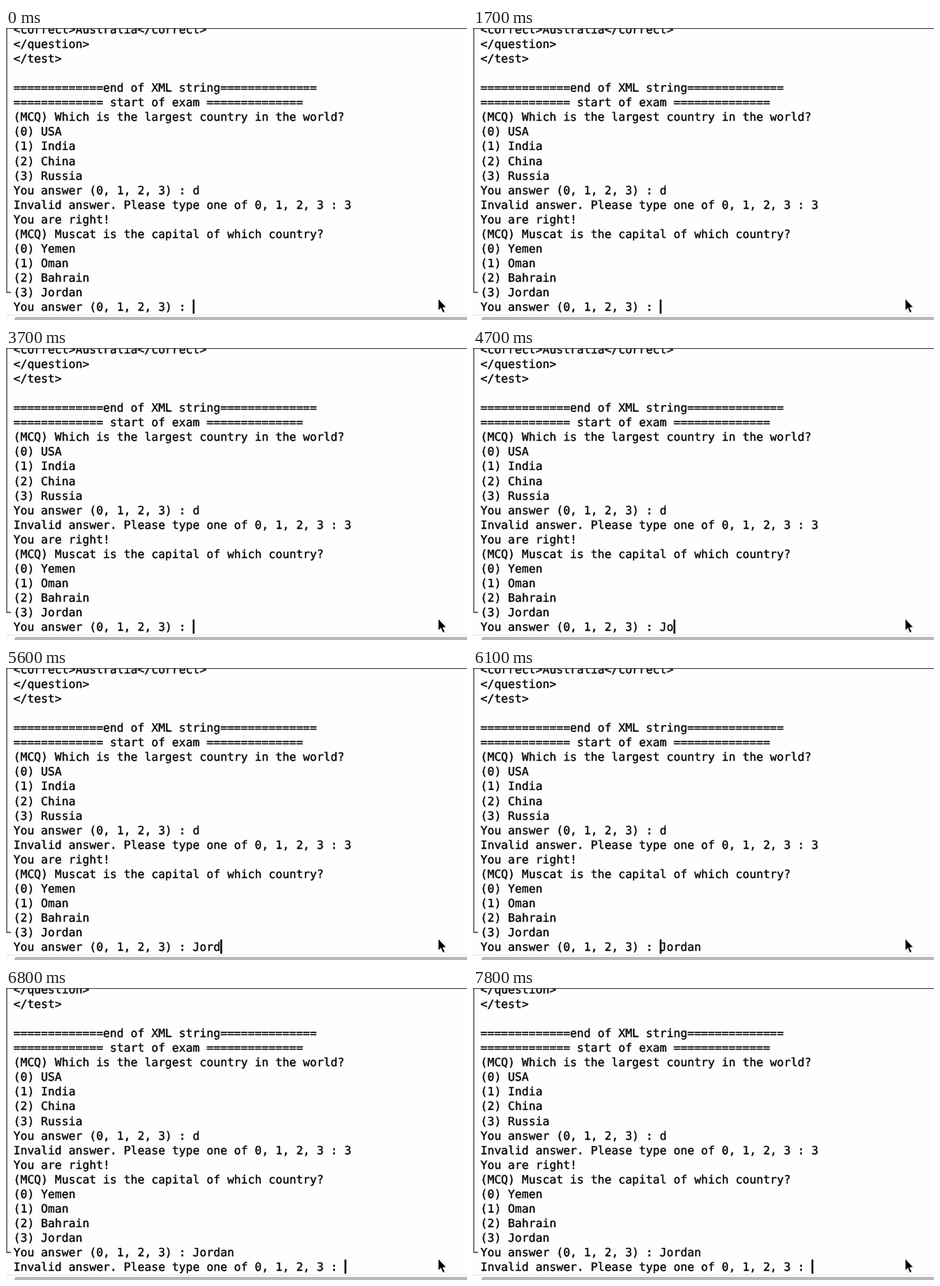
An HTML page for the animation above (8 s loop, 600 px wide and 381 px high).

```html
<!DOCTYPE html>
<html lang="en">
<head>
<meta charset="utf-8">
<title>Quiz console</title>
<style>
  html, body { margin: 0; width: 100%; height: 100%; overflow: hidden; background: #fefefe; }
  svg { display: block; }
  text {
    font: 14.92px "DejaVu Sans Mono", monospace; white-space: pre; text-rendering: geometricPrecision;
    fill: #000; stroke: #000; stroke-width: .35px;
  }
</style>
</head>
<body>
<svg width="600" height="381" viewBox="0 0 600 381">
  <g id="rows"></g>
  <rect id="caret" y="354.3" width="2.4" height="18.5"/>
  <rect width="600" height="1.2" fill="#555"/>
  <path d="M1 0V345H6.5" fill="none" stroke="#444" stroke-width="1.3"/>
  <rect y="374" width="600" height="1" fill="#e4e4e4"/>
  <rect x="11" y="377" width="620" height="8" rx="3" fill="#b8b8b8"/>
  <path d="M562.5 353V368.7L566 365.6L568.6 371.6L571.2 370.5L568.7 364.7H573.2Z" fill="#000" stroke="#fff" stroke-width=".8"/>
</svg>
<script>
const LEFT = 9.7, CHAR = 8.98, LINE = 19.05, BASE = 369, LOOP = 8000;
const bar = n => "=".repeat(n);
const prompt = "You answer (0, 1, 2, 3) : ";
const retry = "Invalid answer. Please type one of 0, 1, 2, 3 : ";
const choices = names => names.map((name, i) => `(${i}) ${name}`);
const log = [
  "<correct>Australia</correct>", "</question>", "</test>", "",
  bar(13) + "end of XML string" + bar(14),
  bar(13) + " start of exam " + bar(14),
  "(MCQ) Which is the largest country in the world?",
  ...choices(["USA", "India", "China", "Russia"]),
  prompt + "d", retry + "3", "You are right!",
  "(MCQ) Muscat is the capital of which country?",
  ...choices(["Yemen", "Oman", "Bahrain", "Jordan"])
];
const answer = "Jordan";
// [time, letters typed]
const keys = [[4400, 1], [4700, 2], [5200, 3], [5600, 4], [5700, 6]];

const rows = document.getElementById("rows");
const caret = document.getElementById("caret");
for (let i = 0; i <= log.length + 1; i++)
  rows.append(document.createElementNS("http://www.w3.org/2000/svg", "text"));

function draw(t) {
  const typed = keys.reduce((n, [at, count]) => t >= at ? count : n, 0);
  const lines = [...log, prompt + answer.slice(0, typed)];
  if (t >= 6300) lines.push(t < 6800 ? "" : retry);

  [...rows.children].forEach((row, i) => {
    row.textContent = lines[i] || "";
    row.setAttribute("x", LEFT);
    row.setAttribute("y", BASE - LINE * (lines.length - 1 - i));
  });

  const col = t >= 6100 && t < 6300 ? prompt.length : lines.at(-1).length;
  const hidden = t < 4400 ? (t + 300) % 1000 >= 500 : t >= 7300 && t < 7800;
  caret.setAttribute("x", LEFT - 0.2 + col * CHAR);
  caret.setAttribute("visibility", hidden ? "hidden" : "visible");
}

function tick() {
  draw(performance.now() % LOOP);
  requestAnimationFrame(tick);
}
tick();
</script>
</body>
</html>
```
